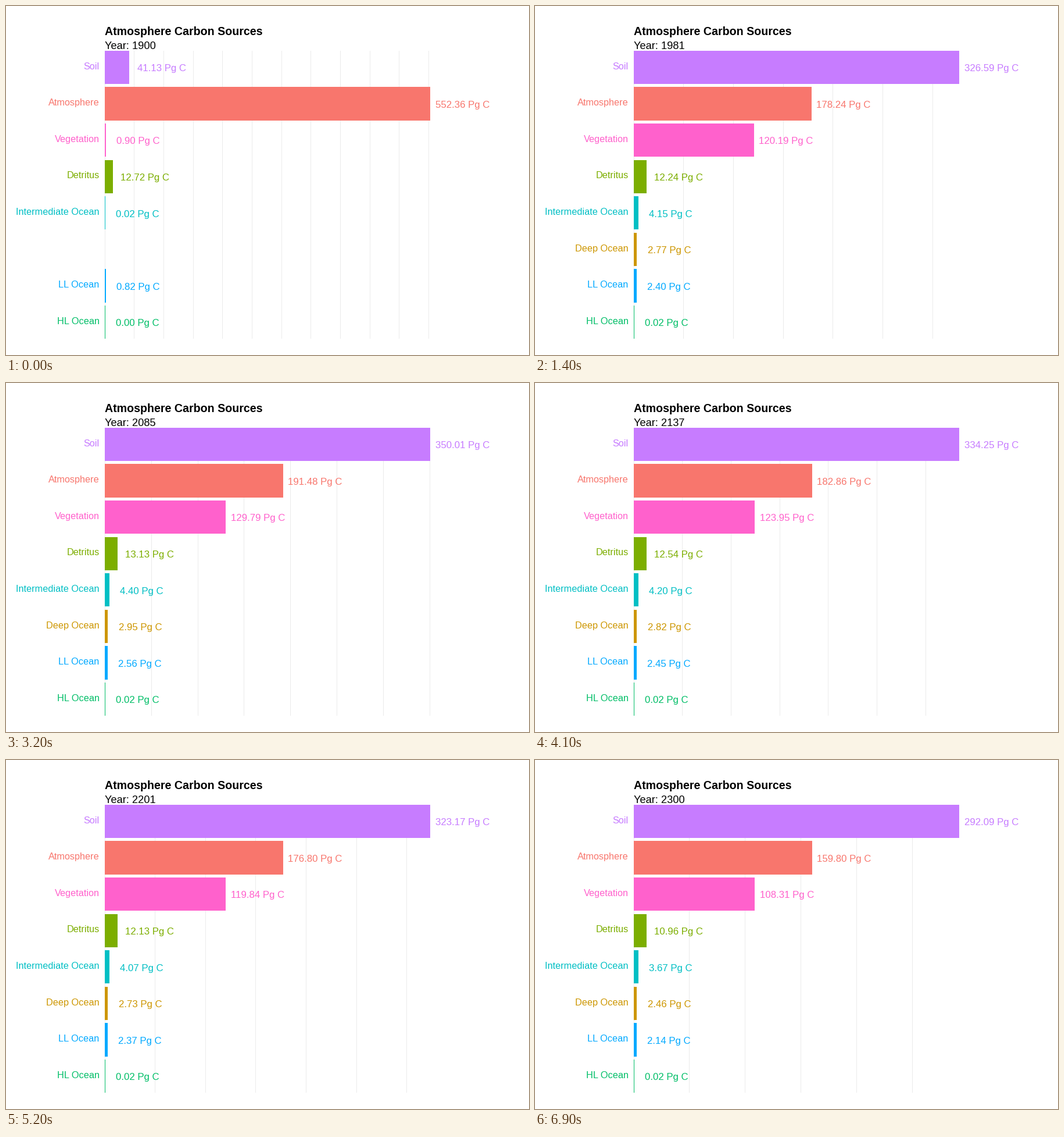
A matplotlib script that plays this animation: 900x600 px, repeating every 10 s.

```python
import math

import matplotlib.pyplot as plt
import numpy as np
from matplotlib.animation import FuncAnimation
from matplotlib.patches import Rectangle

W, H, DPI = 900, 600, 100
LEFT, SPAN = 170, 559.6          # panel start and width of the longest bar
TOP, BOTTOM, ROW, BAR = 77, 572, 62.65, 56.32
LAST, HOLD = 69, 30              # final step, extra ticks it stays
MIX, TAU = 7, 2.1                # step where pools start settling, rate

# name, colour, first value, value at MIX, settled ratio to soil, early rate
POOLS = [
    ("Soil", "#C77CFF", 41.13, 329.51, 1.0, 0.6),
    ("Atmosphere", "#F8766D", 552.36, 168.02, 0.54708, 0.6),
    ("Vegetation", "#FF61CC", 0.90, 96.36, 0.370818, 0.05),
    ("Detritus", "#7CAE00", 12.72, 12.03, 0.037522, 0.3),
    ("Intermediate Ocean", "#00BFC4", 0.02, 5.28, 0.0125795, 0.4),
    ("Deep Ocean", "#CD9600", 0.0, 3.19, 0.0084355, 0.3),
    ("LL Ocean", "#00A9FF", 0.82, 2.61, 0.007323, 0.8),
    ("HL Ocean", "#00BE67", 0.001, 0.02, 0.00006, 0.5),
]
SOIL_T = np.array([7, 12, 17, 22, 27, 32, 41, 52, 69], float)
SOIL_V = np.array([329.51, 324, 333.5, 345.66, 352.6, 350.01,
                   334.25, 323.17, 292.09])
SOIL_M = np.gradient(SOIL_V, SOIL_T)


def soil(n):
    """Cubic Hermite curve through the soil points."""
    j = min(int(np.searchsorted(SOIL_T, n, side="right")) - 1, len(SOIL_T) - 2)
    h = SOIL_T[j + 1] - SOIL_T[j]
    u = (n - SOIL_T[j]) / h
    return ((1 + 2 * u) * (1 - u) ** 2 * SOIL_V[j]
            + u * (1 - u) ** 2 * h * SOIL_M[j]
            + u * u * (3 - 2 * u) * SOIL_V[j + 1]
            + u * u * (u - 1) * h * SOIL_M[j + 1])


def amounts(n):
    out = []
    for name, _, first, mid, ratio, k in POOLS:
        if n < MIX:
            g = (1 - math.exp(-k * n)) / (1 - math.exp(-k * MIX))
            v = first + (mid - first) * g
            if name == "Detritus":
                v += 30 * n * math.exp(-n) * (1 - n / MIX)
        else:
            start = mid / SOIL_V[0]
            v = soil(n) * (ratio + (start - ratio) * math.exp((MIX - n) / TAU))
        out.append(v)
    return out


fig = plt.figure(figsize=(W / DPI, H / DPI), dpi=DPI, facecolor="white")
ax = fig.add_axes([0, 0, 1, 1])
ax.set_xlim(0, W)
ax.set_ylim(H, 0)
ax.axis("off")


def box(x, y, w, h, color, z):
    return ax.add_patch(Rectangle((x, y), w, h, fc=color, lw=0,
                                  antialiased=False, zorder=z))


def label(x, y, s, px, color="black", **kw):
    return ax.text(x, y, s, fontsize=px * 72 / DPI, color=color,
                   family="Liberation Sans", va="baseline", zorder=3, **kw)


label(169.5, 50, "Atmosphere Carbon Sources", 19.7, weight="bold")
year = label(169.5, 74, "", 18.3)
grid = [box(LEFT, TOP, 1, BOTTOM - TOP, "#EBEBEB", 1) for _ in range(13)]

names, bars, values = [], [], []
for i, (name, color, *_) in enumerate(POOLS):
    y0 = TOP + 0.05 + ROW * i
    top, end = math.floor(y0), math.floor(y0 + BAR) + 1
    bars.append(box(LEFT, top, 1, end - top, color, 2))
    names.append(label(160.5, round(108.55 + ROW * i), name, 16.3, color,
                       ha="right"))
    values.append(label(0, round(111.92 + ROW * i), "", 16.7, color))


def draw(i):
    n = min(i, LAST)
    vals = amounts(n)
    peak = max(vals)
    year.set_text(f"Year: {1900 + 400 * n // LAST}")

    for k, line in enumerate(grid):
        line.set_x(LEFT + math.floor(50 * k * SPAN / peak + 0.15))
        line.set_visible(50 * k <= peak)

    for v, name, bar, value in zip(vals, names, bars, values):
        w = v / peak * SPAN
        bar.set_width(math.floor(w + 0.2) + 1)
        text = f"{v:6.2f} Pg C"
        short = text.lstrip()
        value.set_text(short)
        value.set_x(round(LEFT + w + 9 + 5 * (len(text) - len(short))))
        for part in (name, bar, value):
            part.set_visible(v > 0)
    return [year, *grid, *names, *bars, *values]


anim = FuncAnimation(fig, draw, frames=LAST + 1 + HOLD, interval=100,
                     init_func=lambda: draw(0), repeat=True, repeat_delay=0)
plt.show()
```
